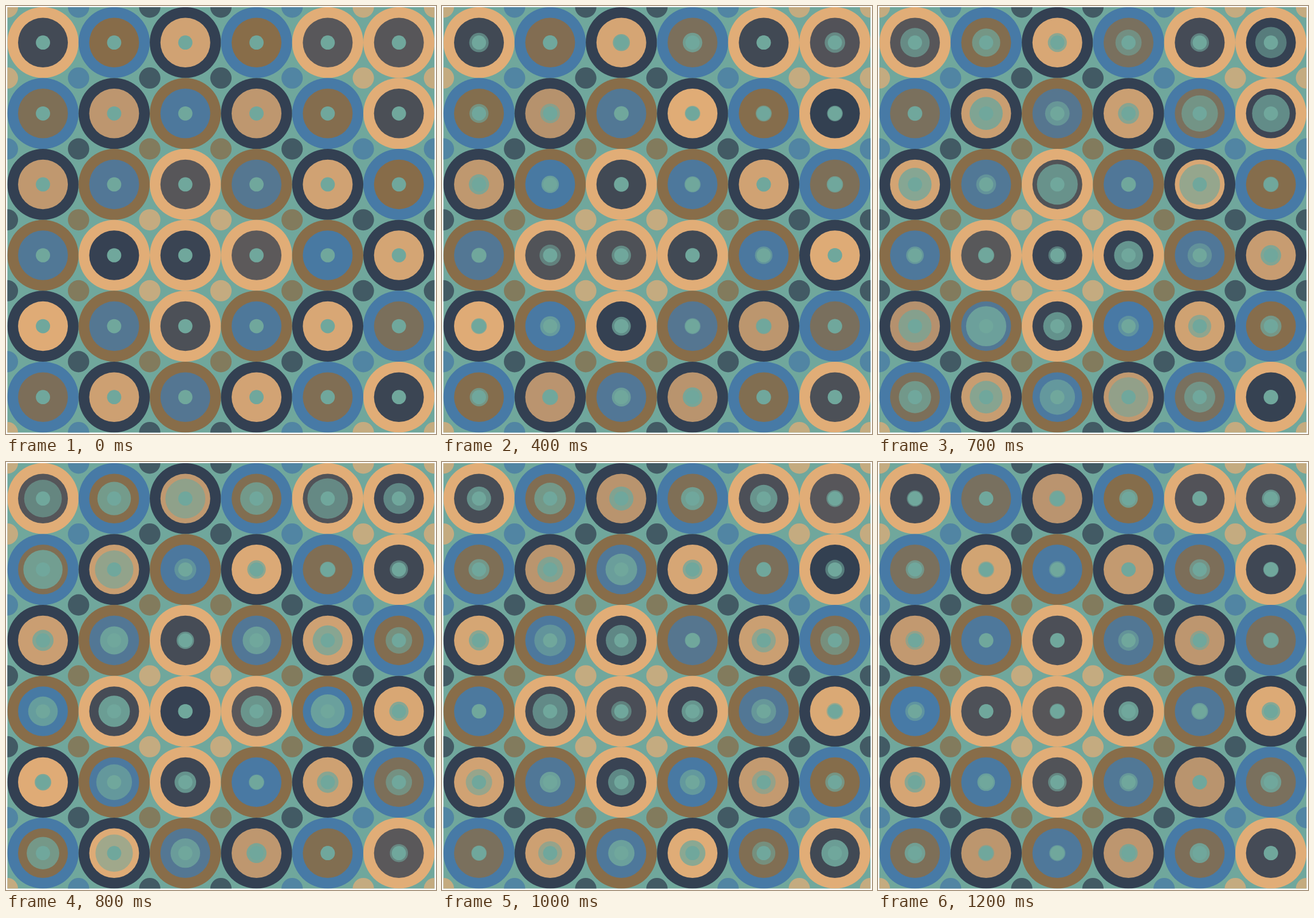
Write an HTML page with a canvas that moves like this. It is 751 px wide and 746 px high and loops after 1.3 s.

```html
<!DOCTYPE html>
<html lang="en">
<head>
<meta charset="utf-8">
<title>Pulsing circles</title>
<style>
  html, body { margin: 0; width: 100%; height: 100%; overflow: hidden; background: #fff; }
  canvas { display: block; width: 100vw; height: 100vh; }
</style>
</head>
<body>
<canvas id="stage" width="751" height="746"></canvas>
<script>
const ctx = document.getElementById('stage').getContext('2d');
const STEP = 100, STEPS = 13, GRID = 6;
const LEFT = 2.4, TOP = 1.9, CELL_W = 124.33, CELL_H = 123.6;
const TEAL = '#70a79c', ORANGE = '#e1ad77', BLUE = '#477aa6', NAVY = '#334052', BROWN = '#886d49';
const DOT = 0.2; // sizes are fractions of a cell

// Ring colours by distance from the middle of the diamond
const BANDS = [ORANGE, ORANGE, BROWN, NAVY, BLUE, ORANGE, ORANGE];
const INNER = { [ORANGE]: NAVY, [NAVY]: ORANGE, [BLUE]: BROWN, [BROWN]: BLUE };

const band = (col, row, midCol, midRow) =>
  BANDS[Math.abs(col - midCol) + Math.abs(row - midRow)];

function random(seed) {
  return () => {
    seed = (seed + 0x6d2b79f5) | 0;
    let t = Math.imul(seed ^ (seed >>> 15), 1 | seed);
    t = (t + Math.imul(t ^ (t >>> 7), 61 | t)) ^ t;
    return ((t ^ (t >>> 14)) >>> 0) / 4294967296;
  };
}

// Column and row are in cell units
function disc(col, row, size, color, alpha = 1) {
  ctx.globalAlpha = alpha;
  ctx.fillStyle = color;
  ctx.beginPath();
  ctx.ellipse(LEFT + col * CELL_W, TOP + row * CELL_H,
    size * CELL_W / 2, size * CELL_H / 2, 0, 0, Math.PI * 2);
  ctx.fill();
}

// Halos stay hidden at first, then swell and shrink again
const swell = step => step <= 2 ? 0 : Math.sin(Math.PI * (step - 2) / 12) ** 2;

function drawCell(col, row, step, rand) {
  const x = col + 0.5, y = row + 0.5;
  const ring = band(col, row, 2, 3);
  const tint = 0.75 + 0.25 * rand();
  const halo = DOT + 0.4 * swell(step) * rand() ** 1.2;
  const haze = 0.55 + 0.35 * rand();
  disc(x, y, 1, ring);
  disc(x, y, 0.7, INNER[ring], tint);
  if (halo > DOT) disc(x, y, halo, TEAL, haze);
  disc(x, y, DOT, TEAL);
}

function drawCorner(col, row) {
  const color = band(Math.min(col, GRID - 1), Math.max(row, 1), 2.5, 3.5);
  disc(col, row, 0.3, color, 0.75);
}

function draw(step) {
  const rand = random(step + 1);
  ctx.globalAlpha = 1;
  ctx.fillStyle = '#fff';
  ctx.fillRect(0, 0, 751, 746);
  ctx.save();
  ctx.beginPath();
  ctx.rect(LEFT, TOP, CELL_W * GRID, CELL_H * GRID);
  ctx.clip();
  ctx.fillStyle = TEAL;
  ctx.fillRect(0, 0, 751, 746);
  for (let row = 0; row <= GRID; row++)
    for (let col = 0; col <= GRID; col++) drawCorner(col, row);
  for (let row = 0; row < GRID; row++)
    for (let col = 0; col < GRID; col++) drawCell(col, row, step, rand);
  ctx.restore();
}

const start = performance.now();
let shown = -1;
function tick() {
  const step = Math.floor((performance.now() - start) / STEP) % STEPS;
  if (step !== shown) draw(shown = step);
  requestAnimationFrame(tick);
}
tick();
</script>
</body>
</html>
```
